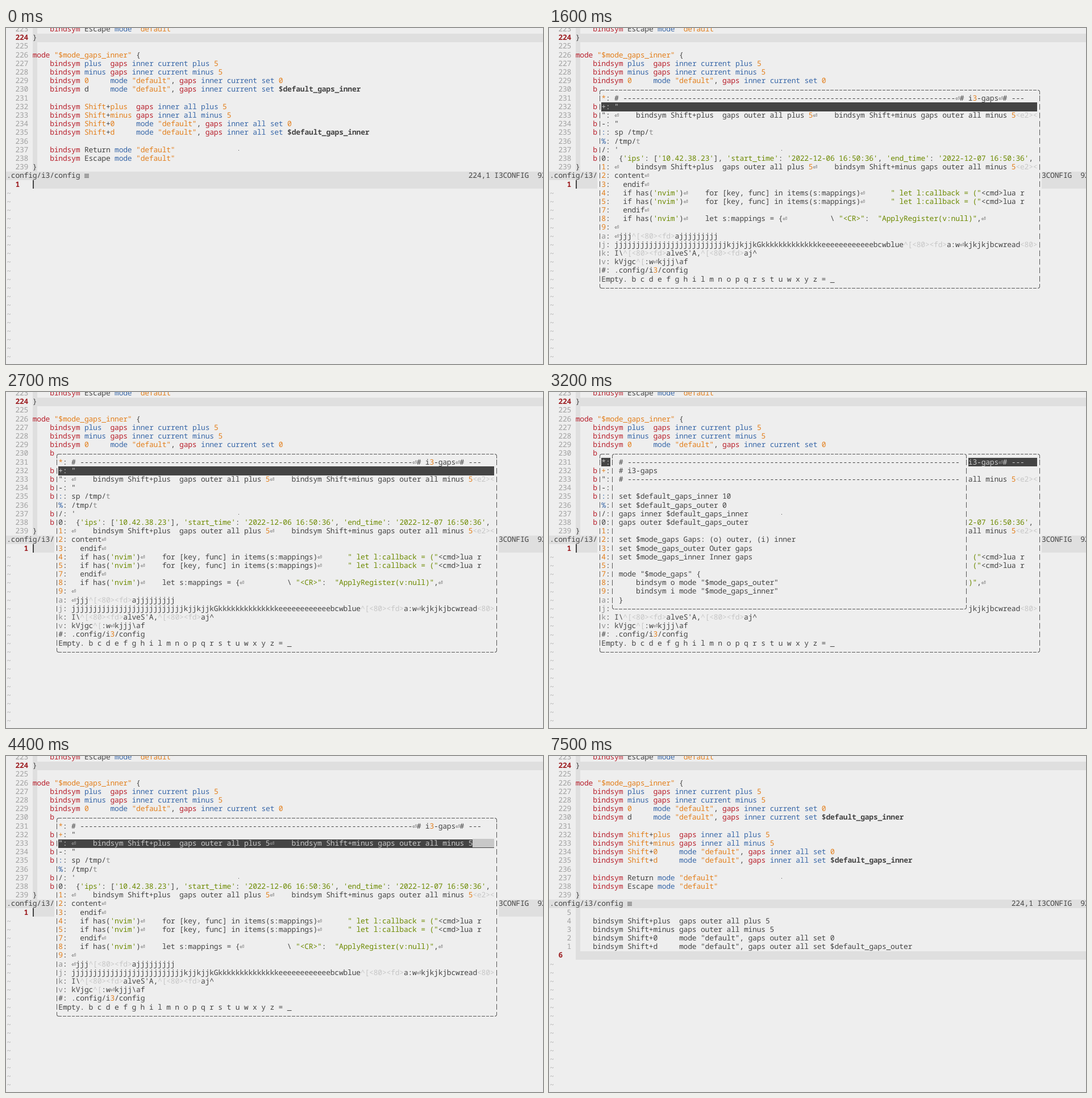
An HTML page for the animation above (7.8 s loop, 945 by 592 pixels).

```html
<!DOCTYPE html>
<html lang="en">
<head>
<meta charset="utf-8">
<title>Register picker</title>
<style>
html, body { margin: 0; width: 100%; height: 100%; overflow: hidden; background: #eee; }
#stage {
  --cw: 7.594px; --rh: 15.188px;
  position: relative; width: 945px; height: 592px; overflow: hidden;
  background: #eee; color: #444;
  font: 13px/var(--rh) "Noto Sans Mono", "DejaVu Sans Mono", monospace;
  font-variant-ligatures: none; text-rendering: geometricPrecision;
}
#stage div { position: absolute; }
.row { white-space: pre; height: var(--rh); margin-top: -.6px; }
.band { background: #dfdfdf; }
.r { color: #b8202c; }
.o { color: #e37f1c; }
.b { color: #3867a8; }
.g { color: #6d8a00; }
.n { color: #8e8e8e; }
.l { color: #c6c6c6; }
.k { font-weight: bold; }
.num { color: #a0a0a0; }
.now { color: #9c1c20; font-weight: bold; }
.tilde { color: #b6b6b6; margin-top: .6px; }
i {
  display: inline-block; width: var(--cw); letter-spacing: 0;
  font: normal 13px/0 "DejaVu Sans Mono", "DejaVu Sans", monospace;
}
.icon { background: repeating-linear-gradient(#666 0 1px, transparent 1px 2px); }
.dot, .cursor { background: #444; }
.box { background: #eee; }
.h { height: 1px; background: repeating-linear-gradient(90deg, transparent 0 .9px, #555 .9px 6.5px, transparent 6.5px var(--cw)); }
.v { width: 1px; background: repeating-linear-gradient(transparent 0 2.5px, #555 2.5px 12.5px, transparent 12.5px var(--rh)); }
.corner { box-sizing: border-box; border: 0 solid #555; width: 4px; height: 8px; }
.sel { background: #444; color: #c8c8c8; }
.sel span { color: inherit; }
.sel .l { background: #c8c8c8; display: inline-block; height: var(--rh); vertical-align: top; }
</style>
</head>
<body>
<div id="stage"></div>
<script>
const CW = 7.594, RH = 15.188, X0 = 1.2, Y0 = 9.9, LOOP = 7800;
const stage = document.getElementById('stage');
const x = col => X0 + col * CW;
const y = row => Y0 + row * RH;

function add(parent, cls, left, top, w, h) {
  const el = document.createElement('div');
  el.className = cls;
  el.style.left = left + 'px';
  el.style.top = top + 'px';
  if (w) el.style.width = w + 'px';
  if (h) el.style.height = h + 'px';
  parent.appendChild(el);
  return el;
}
const layer = () => add(stage, 'layer', 0, 0);

const esc = s => s.replace(/&/g, '&amp;').replace(/</g, '&lt;').replace(/⏎/g, '<i>⏎</i>');
const tag = (cls, s) => `<span class="${cls}">${esc(s)}</span>`;

// Each named group of the pattern is the class of its token.
function paint(text, pattern) {
  let out = '', last = 0;
  for (const m of text.matchAll(pattern)) {
    const cls = Object.keys(m.groups).find(k => m.groups[k] !== undefined);
    out += esc(text.slice(last, m.index)) + tag(cls, m[0]);
    last = m.index + m[0].length;
  }
  return out + esc(text.slice(last));
}
const CONFIG = /(?<o>"[^"]*"|\d+|Shift|(?<=\+)(?:plus|minus|d))|(?<k>\$\w+)|(?<r>^mode|bindsym|gaps)|(?<b>\b(?:mode|inner|current|plus|minus|set|all)\b)/g;
const REGISTER = /(?<l>\^\[|(?:<(?:80|fd|e2)>)+<?$|<(?:80|fd|e2)>)|(?<g>'[^']+'|"[^"]+")|(?<o>\d)|(?<n>(?<=\/tmp\/)t)/g;

function row(parent, col, r, html, cls = '') {
  const el = add(parent, 'row ' + cls, x(col), y(r));
  el.innerHTML = html;
  return el;
}

// Fit the font's advance to the terminal cell.
const probe = row(stage, 0, 0, '0'.repeat(100));
stage.style.letterSpacing = CW - probe.getBoundingClientRect().width / 100 + 'px';
probe.remove();

// Upper window
const config = `    bindsym Escape mode "default"
}

mode "$mode_gaps_inner" {
    bindsym plus  gaps inner current plus 5
    bindsym minus gaps inner current minus 5
    bindsym 0     mode "default", gaps inner current set 0
    bindsym d     mode "default", gaps inner current set $default_gaps_inner

    bindsym Shift+plus  gaps inner all plus 5
    bindsym Shift+minus gaps inner all minus 5
    bindsym Shift+0     mode "default", gaps inner all set 0
    bindsym Shift+d     mode "default", gaps inner all set $default_gaps_inner

    bindsym Return mode "default"
    bindsym Escape mode "default"
}`.split('\n');
const upper = layer();
add(upper, 'band', 47, y(-1), CW, RH * 17);
add(upper, 'band', 47, y(0), 898, RH);
config.forEach((line, i) => {
  row(upper, 2, i - 1, 223 + i, i === 1 ? 'now' : 'num');
  row(upper, 6, i - 1, paint(line, CONFIG));
});
add(upper, 'band', 0, y(16), 945, RH);
row(upper, 0, 16, '.config/i3/config');
add(upper, 'icon', 138, 257, 8, 7);
row(upper, 107, 16, '224,1 I3CONFIG  92%');

// Lower window
const outer = `    bindsym Shift+plus  gaps outer all plus 5
    bindsym Shift+minus gaps outer all minus 5
    bindsym Shift+0     mode "default", gaps outer all set 0
    bindsym Shift+d     mode "default", gaps outer all set $default_gaps_outer`.split('\n');

function lower(lines) {
  const el = layer(), last = lines.length - 1;
  add(el, 'band', 47, y(17), CW, RH * lines.length);
  add(el, 'band', 47, y(17 + last), 898, RH);
  lines.forEach((line, i) => row(el, 6, 17 + i, esc(line)));
  for (let r = 18 + last; r < 38; r++) row(el, 0, r, '~', 'tilde');
  return el;
}
function numbers(count, relative) {
  const el = layer();
  for (let i = 0; i < count; i++) {
    const now = i === count - 1;
    const n = relative && !now ? count - 1 - i : i + 1;
    row(el, now && relative ? 2 : 4, 17 + i, n, now ? 'now' : 'num');
  }
  return el;
}
const texts = [lower(['']), lower(['', ...outer, ''])];
const gutters = [1, 6].map(n => [numbers(n, false), numbers(n, true)]);
const cursor = add(stage, 'cursor', 47, 0, 2, RH);

// Floating windows
function frame(c0, c1, r0, r1) {
  const el = layer();
  const w = (c1 - c0 + 1) * CW, h = (r1 - r0 + 1) * RH;
  add(el, 'box', x(c0), y(r0), w, h);
  const [left, right] = [c0, c1].map(c => Math.round(x(c + .5)));
  const [top, bottom] = [r0, r1].map(r => Math.round(y(r + .5)));
  for (const py of [top, bottom]) add(el, 'h', x(c0 + 1), py, w - 2 * CW);
  for (const px of [left, right]) add(el, 'v', px, y(r0 + 1), 0, h - 2 * RH);
  const corner = (px, py, width, radius) => {
    const s = add(el, 'corner', px, py).style;
    s.borderWidth = width;
    s.borderRadius = radius;
  };
  corner(left, top, '1px 0 0 1px', '4px 0 0 0');
  corner(right - 3, top, '1px 1px 0 0', '0 4px 0 0');
  corner(left, bottom - 7, '0 0 1px 1px', '0 0 0 4px');
  corner(right - 3, bottom - 7, '0 1px 1px 0', '0 0 4px 0');
  return el;
}

const rule = '# ' + '-'.repeat(77);
const pasted = '⏎    bindsym Shift+plus  gaps outer all plus 5⏎    bindsym Shift+minus gaps outer all minus 5<e2><';
const loop = `  if has('nvim')⏎    for [key, func] in items(s:mappings)⏎      " let l:callback = ("<cmd>lua r`;
const esc80 = '^[<80><fd>';
const registers = [
  ['*', rule + '⏎# i3-gaps⏎# ---'],
  ['+', '"'],
  ['"', pasted],
  ['-', '"'],
  [':', 'sp /tmp/t'],
  ['%', '/tmp/t'],
  ['/', "'"],
  ['0', " {'ips': ['10.42.38.23'], 'start_time': '2022-12-06 16:50:36', 'end_time': '2022-12-07 16:50:36',"],
  ['1', pasted],
  ['2', 'content⏎'],
  ['3', '  endif⏎'],
  ['4', loop],
  ['5', loop],
  ['7', '  endif⏎'],
  ['8', `  if has('nvim')⏎    let s:mappings = {⏎          \\ "<CR>":  "ApplyRegister(v:null)",⏎`],
  ['9', '⏎'],
  ['a', '⏎jjj' + esc80 + 'a' + 'j'.repeat(9)],
  ['j', 'j'.repeat(26) + 'kjjkjjkG' + 'k'.repeat(14) + 'e'.repeat(12) + 'bcwblue' + esc80 + 'a:w⏎kjkjkjbcwread<80>'],
  ['k', 'I\\' + esc80 + "alveS'A," + esc80 + 'aj^'],
  ['v', 'kVjgc^[:w⏎kjjj\\af'],
  ['#', '.config/i3/config']
];
const keyClass = k => /[*+1-9]/.test(k) ? 'o' : /[:%]/.test(k) ? 'b' : /[ajkv]/.test(k) ? 'n' : '';

const popup = frame(11, 113, 6, 29);
const entries = registers.map(([key, body], i) => {
  const bar = add(popup, 'bar', x(12), y(7 + i), 101 * CW, RH);
  const text = row(popup, 12, 7 + i, tag(keyClass(key), key) + ': ' + paint(body, REGISTER));
  text.style.left = text.style.top = 0;
  bar.appendChild(text);
  return bar;
});
row(popup, 12, 28, 'Empty. ' + [...'bcdefghilmnopqrstuwxyz=_'].join(' '));

function preview(top, lines) {
  const width = Math.max(...lines.map(s => s.length));
  const el = frame(14, 17 + width, top, top + lines.length + 1);
  lines.forEach((line, i) => row(el, 16, top + 1 + i, esc(line)));
  return el;
}
const previews = [
  preview(6, [rule, '# i3-gaps', rule, ...`
set $default_gaps_inner 10
set $default_gaps_outer 0
gaps inner $default_gaps_inner
gaps outer $default_gaps_outer

set $mode_gaps Gaps: (o) outer, (i) inner
set $mode_gaps_outer Outer gaps
set $mode_gaps_inner Inner gaps

mode "$mode_gaps" {
    bindsym o mode "$mode_gaps_outer"
    bindsym i mode "$mode_gaps_inner"
}`.split('\n')]),
  null,
  preview(8, outer)
];
add(stage, 'dot', 409, 215, 1, 1);

// sel and peek are register indexes, -1 for none
const steps = [
  [0, { text: 0, rel: 1, cursor: 2, sel: -1, peek: -1 }],
  [400, { cursor: 0 }],
  [600, { cursor: 2, rel: 0, sel: 0 }],
  [1600, { sel: 1 }],
  [1800, { sel: 2 }],
  [2100, { peek: 2 }],
  [2400, { peek: -1 }],
  [2700, { sel: 1 }],
  [2900, { sel: 0 }],
  [3200, { peek: 0 }],
  [3600, { peek: -1 }],
  [4100, { sel: 1 }],
  [4400, { sel: 2 }],
  [4800, { sel: -1, text: 1 }],
  [5800, { cursor: 0 }],
  [6000, { cursor: 2 }],
  [6500, { cursor: CW }],
  [6600, { rel: 1 }],
  [7500, { cursor: 0 }]
];
const show = (el, on) => { el.style.display = on ? '' : 'none'; };

function draw(t) {
  const s = Object.assign({}, ...steps.filter(([at]) => at <= t).map(([, change]) => change));
  texts.forEach((el, i) => show(el, i === s.text));
  gutters.forEach((pair, i) => pair.forEach((el, j) => show(el, i === s.text && j === s.rel)));
  show(cursor, s.cursor > 0);
  cursor.style.width = s.cursor + 'px';
  cursor.style.top = y(s.text ? 22 : 17) + 'px';
  show(popup, s.sel >= 0);
  entries.forEach((el, i) => el.classList.toggle('sel', i === s.sel));
  previews.forEach((el, i) => el && show(el, i === s.peek));
}

const start = performance.now();
function tick() {
  draw((performance.now() - start) % LOOP);
  requestAnimationFrame(tick);
}
tick();
</script>
</body>
</html>
```
